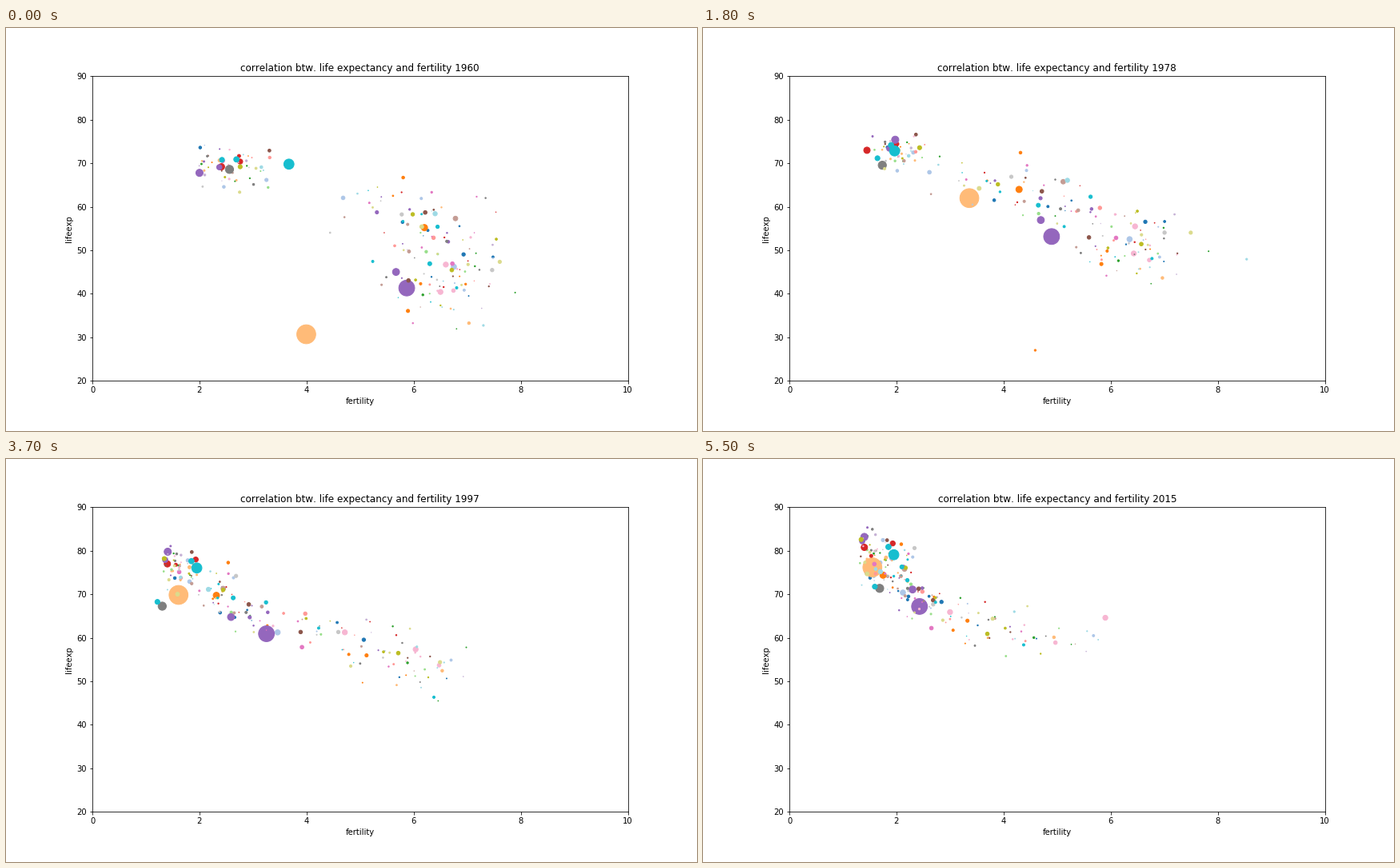
A matplotlib script that plays this animation: 864x504 px, repeating every 5.6 s.

```python
import numpy as np
import matplotlib.pyplot as plt
from matplotlib.animation import FuncAnimation

plt.rcParams["text.kerning_factor"] = 6

START, COUNT = 1960, 56
YEARS = START + np.arange(COUNT)
PROGRESS = np.arange(COUNT) / (COUNT - 1)
PALETTE = plt.get_cmap("tab20").colors
(BLUE, PALE_BLUE, ORANGE, PEACH, GREEN, PALE_GREEN, RED, SALMON, PURPLE, LILAC,
 BROWN, TAN, PINK, PALE_PINK, GRAY, SILVER, OLIVE, SAND, CYAN, PALE_CYAN) = range(20)

bubbles = []  # (palette index, population in millions, fertility, life expectancy)


def bell(center, width):
    return np.exp(-((YEARS - center) / width) ** 2)


def fall(first, last, mid, width):
    """S-shaped change that starts and ends exactly at the given values."""
    s = 1 / (1 + np.exp((mid - YEARS) / width))
    return first + (last - first) * (s - s[0]) / (s[-1] - s[0])


def bubble(color, pop, fert, mid, life, width=6, power=0.7, shock=None):
    """fert and life are (first, last); shock is (year, width, fert change, life change)."""
    f = fall(*fert, mid, width)
    e = life[0] + (life[1] - life[0]) * PROGRESS ** power
    if shock:
        wave = bell(*shock[:2])
        f, e = f + shock[2] * wave, e + shock[3] * wave
    bubbles.append((color, pop, f, e))


def industrial(color, pop, fert, mid, life, **options):
    bubble(color, pop, fert, mid, life, **{"width": 2.5, "power": 1, **options})


def add_large():
    famine = (1960.5, 1.2, -3.1, -23)
    collapse = (1999, 11, -0.45, -3.6)
    bubble(PEACH, 644, (6.6, 1.55), 1974.7, (50, 76.2), width=5, shock=famine)
    bubble(PURPLE, 449, (5.87, 2.43), 1986, (41.3, 67.2), width=11)
    bubble(PURPLE, 88, (5.67, 2.3), 1983, (45, 71.1))
    bubble(ORANGE, 72, (6.2, 1.75), 1978, (55.2, 74.4), width=10)
    bubble(PALE_BLUE, 49, (6.75, 2.12), 1992, (46.2, 70.4), power=1.2)
    bubble(PALE_PINK, 46, (6.6, 3), 1997, (46.7, 65.9))
    bubble(PALE_PINK, 45, (6.5, 5.9), 1990, (40.4, 64.6), power=0.9)
    bubble(TAN, 38, (6.78, 2.15), 1981, (57.3, 75.8))
    bubble(PALE_CYAN, 33, (6.4, 1.7), 1984, (58.4, 75.2))
    bubble(CYAN, 28, (6.3, 2.1), 1980, (46.9, 76.3), width=9)
    bubble(SAND, 27, (6.15, 1.45), 1976, (55.4, 74.7))

    industrial(CYAN, 186, (3.67, 1.95), 1966, (69.8, 79.1))
    industrial(PURPLE, 93, (2, 1.4), 1986, (67.8, 83.2), power=0.63)
    industrial(RED, 73, (2.41, 1.4), 1970.5, (69.2, 80.8))
    industrial(CYAN, 52, (2.69, 1.85), 1971, (70.9, 80.9))
    industrial(PURPLE, 50, (2.37, 1.36), 1978, (69.1, 82.2))
    industrial(RED, 46, (2.76, 1.93), 1971, (70.4, 81.7))
    industrial(OLIVE, 30, (2.76, 1.34), 1981, (69.2, 82.6))
    industrial(GRAY, 120, (2.56, 1.74), 1966, (68.6, 71.8), shock=collapse)
    industrial(CYAN, 43, (2.42, 1.65), 1966, (70.8, 72.2), shock=collapse)


def add_troubled():
    bubble(ORANGE, 6, (6.97, 2.7), 1986, (42.2, 69.4), shock=(1977.5, 2.3, -1.6, -29))
    bubble(SALMON, 4, (6.3, 3), 1993, (42.1, 64.3), shock=(2010, 0.4, 0, -31))
    bubble(PALE_CYAN, 5.5, (7.3, 4.2), 1998, (32.7, 66), shock=(1984, 9, 2.1, 0))


def add_rest(n=165):
    rng = np.random.default_rng(11)
    for color in np.arange(n) * 20 // n:
        pop = np.clip(np.exp(rng.normal(1.1, 1.4)), 0.03, 24)
        rank = rng.random()
        if rank < 0.22:
            high, low = rng.uniform(2, 3.6), rng.uniform(1.3, 2)
            mid, width = rng.normal(1976, 4), 6
            first, last = rng.normal(69.5, 2.3), rng.normal(78.5, 3)
            dip = 0
        else:
            poor = (rank - 0.22) / 0.78
            high = min(rng.normal(6.6, 0.6), 7.9)
            low = 1.6 + 0.6 * poor + rng.uniform(0, 0.6)
            mid, width = 1969 + 52 * poor ** 1.2 + rng.normal(0, 4), rng.uniform(7, 10)
            first = 63.5 - 27 * poor + rng.normal(0, 3)
            last = 77 - 17 * poor + rng.normal(0, 2.8)
            dip = rng.uniform(4, 13) if poor > 0.6 and rng.random() < 0.3 else 0
        fert = low + (high - low) / (1 + np.exp((YEARS - mid) / width))
        life = first + (last - first) * PROGRESS ** 0.85 - dip * bell(2002, 7)
        bubbles.append((color, pop, fert, life))


add_large()
add_troubled()
add_rest()
bubbles.sort(key=lambda b: b[0])

fert = np.array([b[2] for b in bubbles])
life = np.array([b[3] for b in bubbles])

fig = plt.figure(figsize=(12, 7), dpi=72, facecolor="white")
ax = fig.add_axes([0.125, 0.125, 0.775, 0.755])
ax.set(xlim=(0, 10), ylim=(20, 90), xlabel="fertility", ylabel="lifeexp")
title = ax.set_title("")
dots = ax.scatter(fert[:, 0], life[:, 0], s=[0.87 * b[1] for b in bubbles],
                  c=[PALETTE[b[0]] for b in bubbles], linewidths=1)


def draw(i):
    dots.set_offsets(np.column_stack([fert[:, i], life[:, i]]))
    title.set_text(f"correlation btw. life expectancy and fertility {START + i}")
    return dots, title


anim = FuncAnimation(fig, draw, frames=COUNT, interval=100, repeat=True,
                     repeat_delay=0, init_func=lambda: draw(0))
plt.show()
```
